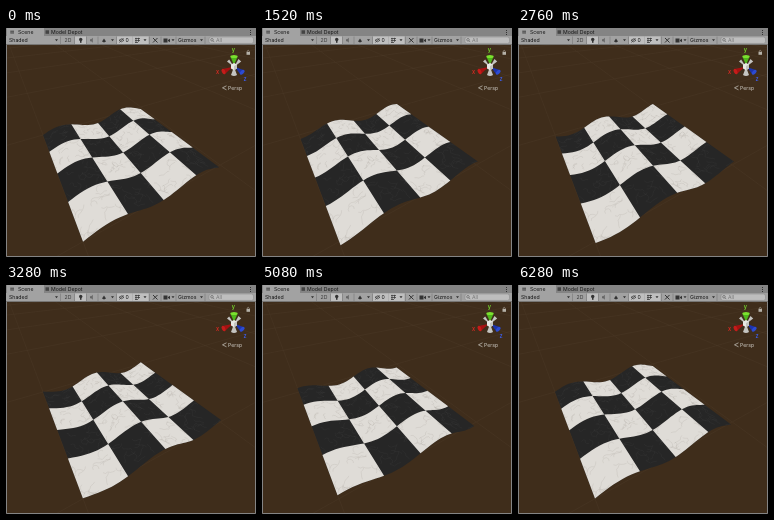
Write an HTML page with a canvas that moves like this. It is 250x229 px and loops after 6320 ms.

```html
<!DOCTYPE html>
<html lang="en">
<head>
<meta charset="utf-8">
<title>Wave</title>
<style>
  html, body { margin: 0; width: 100%; height: 100%; overflow: hidden; background: #3f2d1b; }
  canvas, svg { position: absolute; left: 0; top: 0; width: 250px; height: 229px; }
  text { font: 5.2px Inter, Roboto, sans-serif; fill: #141414; }
  .axis { font-size: 5.5px; font-weight: 600; }
</style>
</head>
<body>
<canvas id="scene" width="250" height="229"></canvas>
<svg viewBox="0 0 250 229">
  <!-- tabs -->
  <rect width="250" height="8" fill="#848484"/>
  <rect x="1" width="37" height="8" fill="#a2a2a2"/>
  <path d="M5 2.5v3M7 2.5v3M4.500 3.300h3.500M4.500 5h3.500" stroke="#333" stroke-width=".6"/>
  <text x="12" y="5.700">Scene</text>
  <rect x="39.500" y="2.300" width="3.500" height="3.500" fill="#444"/>
  <text x="45" y="5.700">Model Depot</text>
  <g fill="#333"><rect x="244" y="2" width="1" height="1"/><rect x="244" y="4" width="1" height="1"/><rect x="244" y="6" width="1" height="1"/></g>

  <!-- toolbar -->
  <rect y="8" width="250" height="8.500" fill="#a2a2a2"/>
  <rect y="16.200" width="250" height=".8" fill="#7a7a7a"/>
  <g fill="#bfbfbf">
    <rect x="69" y="8.500" width="11" height="7.500"/>
    <rect x="111" y="8.500" width="15" height="7.500"/>
    <rect x="126.500" y="8.500" width="16" height="7.500"/>
  </g>
  <path d="M54.500 8.500v7.500M68.500 8.500v7.500M80.500 8.500v7.500M92 8.500v7.500M110.500 8.500v7.500M143.500 8.500v7.500M155 8.500v7.500M170 8.500v7.500M199 8.500v7.500" stroke="#7e7e7e" stroke-width=".7"/>
  <text x="3" y="14.200">Shaded</text>
  <text x="58.500" y="14.200" style="fill:#3a3a3a">2D</text>
  <g fill="#333">
    <path d="M49 11.300h3l-1.500 2zM105 11.300h3l-1.500 2zM137.500 11.300h3l-1.500 2zM165.500 11.300h3l-1.500 2zM194 11.300h3l-1.500 2z"/>
    <circle cx="74.700" cy="11.500" r="1.700"/><rect x="74" y="13" width="1.500" height="1.800"/>
    <path d="M84 11.300h1.200l1.600-1.500v5l-1.600-1.500h-1.200z" fill="#666"/>
    <path d="M96 13.500l2-3 2 3-2 1z"/>
    <path d="M157.500 10.500h4v4h-4zM162 12l2-1.200v3.500l-2-1.200z"/>
  </g>
  <g fill="none" stroke="#333" stroke-width=".7">
    <path d="M113 12.300q2.500-3 5 0q-2.500 3-5 0M113.500 14.500l4-4.500"/>
    <path d="M129 10.500h5M129 12.500h5M129 14.500h3M130 9.800v5M132.500 9.800v4"/>
    <path d="M147 10l4.500 4.500M151.500 10l-4.500 4.500" stroke-width="1"/>
  </g>
  <text x="119.500" y="14.200">0</text>
  <text x="172" y="14.200">Gizmos</text>
  <rect x="203" y="9" width="44.500" height="6.400" rx="2" fill="#bebebe" stroke="#868686" stroke-width=".5"/>
  <g fill="none" stroke="#555" stroke-width=".6"><circle cx="206" cy="11.800" r="1.300"/><path d="M207 12.800l1.200 1.300"/></g>
  <text x="210" y="14" style="fill:#777">All</text>

  <!-- orientation gizmo -->
  <g fill="#c4c4c1">
    <path d="M228 39l4.500-8 2.700 2.600z"/>
    <path d="M228 39l-7-5.500 2.200-2z"/>
    <path d="M228 39l-3 8q3 2 6 0z"/>
  </g>
  <path d="M228 37l-3.600-8.500h7.200z" fill="#4fb51c"/>
  <ellipse cx="228" cy="28.400" rx="3.600" ry="1.500" fill="#7be02f"/>
  <path d="M226.500 39l-10.300 2 2.700 5z" fill="#a51212"/>
  <ellipse cx="217.500" cy="43.600" rx="1.700" ry="2.900" transform="rotate(-27 217.500 43.600)" fill="#c51c1a"/>
  <path d="M229 39l5 7 4.300-3.800z" fill="#1d33ac"/>
  <ellipse cx="236.200" cy="44.200" rx="1.700" ry="2.900" transform="rotate(48 236.200 44.200)" fill="#2c4bd2"/>
  <path d="M225 36.500l3-1.500 3 1.500v4l-3 1.700-3-1.700z" fill="#e8e8e4"/>
  <path d="M228 38l3-1.500v4l-3 1.700z" fill="#c4c4c0"/>
  <text class="axis" x="225.800" y="24" style="fill:#74d52c">y</text>
  <text class="axis" x="210" y="46" style="fill:#d22a22">x</text>
  <text class="axis" x="237.500" y="52.500" style="fill:#3c5ce6">z</text>
  <rect x="240.500" y="24" width="3.500" height="2.800" fill="#b5b1a8"/>
  <path d="M241.200 24v-1q1-1.500 2 0v1" fill="none" stroke="#b5b1a8" stroke-width=".6"/>
  <path d="M220.500 57.800l-4 2 4 2" fill="none" stroke="#d0cdc6" stroke-width=".7"/>
  <text x="222" y="61.700" style="fill:#d0cdc6">Persp</text>

  <!-- window edge -->
  <path d="M.5 17v211.500h249V17" fill="none" stroke="#848484"/>
</svg>
<script>
const LOOP = 6320, STEP = 40, CELLS = 4, SIZE = 10;
const ctx = document.getElementById('scene').getContext('2d');

// Perspective of the unit sheet; h is height in wave amplitudes.
const LIFT = -0.0185;
const depth = (u, v) => 1 + .26 * u - .438 * v;
function project(u, v, h = 0) {
  const w = depth(u, v) + LIFT * h;
  return [
    (37 + 132.8 * u + 6.3 * v + 125 * LIFT * h) / w,
    (107 - 7.5 * u + 13.1 * v + 324 * LIFT * h) / w
  ];
}

function seeded(seed) {
  return () => (seed = (seed * 16807) % 2147483647) / 2147483647;
}

// Marble veins: short wandering lines inside each tile.
const rand = seeded(4211);
const clampTile = x => Math.min(.98, Math.max(.02, x));
const veins = [];
for (let i = 0; i < CELLS; i++) for (let j = 0; j < CELLS; j++) {
  for (let n = 0; n < 18; n++) {
    let u = rand(), v = rand(), angle = rand() * 6.28;
    const points = [];
    for (let k = 0; k < 6; k++) {
      points.push([(i + u) / CELLS, (j + v) / CELLS]);
      angle += (rand() - .5) * 2.4;
      u = clampTile(u + Math.cos(angle) * .06);
      v = clampTile(v + Math.sin(angle) * .06);
    }
    veins.push({ points, white: (i + j) % 2 === 1 });
  }
}

function trace(points) {
  ctx.beginPath();
  points.forEach(p => ctx.lineTo(p[0], p[1]));
}

function drawGround() {
  ctx.fillStyle = '#3f2d1b';
  ctx.fillRect(0, 0, 250, 229);
  ctx.strokeStyle = 'rgba(150,140,125,.1)';
  ctx.lineWidth = .6;
  const line = at => {
    const points = [];
    for (let s = -8; s <= 8; s += .1) {
      const [u, v] = at(s);
      if (depth(u, v) > .12) points.push(project(u, v));
    }
    trace(points);
    ctx.stroke();
  };
  for (let k = -6; k <= 6; k++) {
    line(s => [k, s]);
    line(s => [s, k]);
  }
}

function drawSheet(time) {
  const at = (u, v) => project(u, v, Math.sin(SIZE * u - time));
  const patch = (u0, u1, v0, v1, color) => {
    const steps = Math.round((u1 - u0) * 40), near = [], far = [];
    for (let k = 0; k <= steps; k++) {
      const u = u0 + (u1 - u0) * k / steps;
      far.push(at(u, v0));
      near.unshift(at(u, v1));
    }
    trace(far.concat(near));
    ctx.closePath();
    ctx.fillStyle = color;
    ctx.fill();
  };
  patch(0, 1, 0, 1, '#262626');
  for (let i = 0; i < CELLS; i++) for (let j = 0; j < CELLS; j++) {
    if ((i + j) % 2) patch(i / CELLS, (i + 1) / CELLS, j / CELLS, (j + 1) / CELLS, '#dfdcd7');
  }
  ctx.lineWidth = .8;
  for (const { points, white } of veins) {
    ctx.strokeStyle = white ? 'rgba(125,118,108,.15)' : 'rgba(255,255,255,.04)';
    trace(points.map(([u, v]) => at(u, v)));
    ctx.stroke();
  }
}

function draw(now) {
  const ms = Math.floor((now % LOOP) / STEP) * STEP;
  drawGround();
  drawSheet(ms / LOOP * 2 * Math.PI);
}

const start = performance.now();
function tick() {
  draw(performance.now() - start);
  requestAnimationFrame(tick);
}
tick();
</script>
</body>
</html>
```
